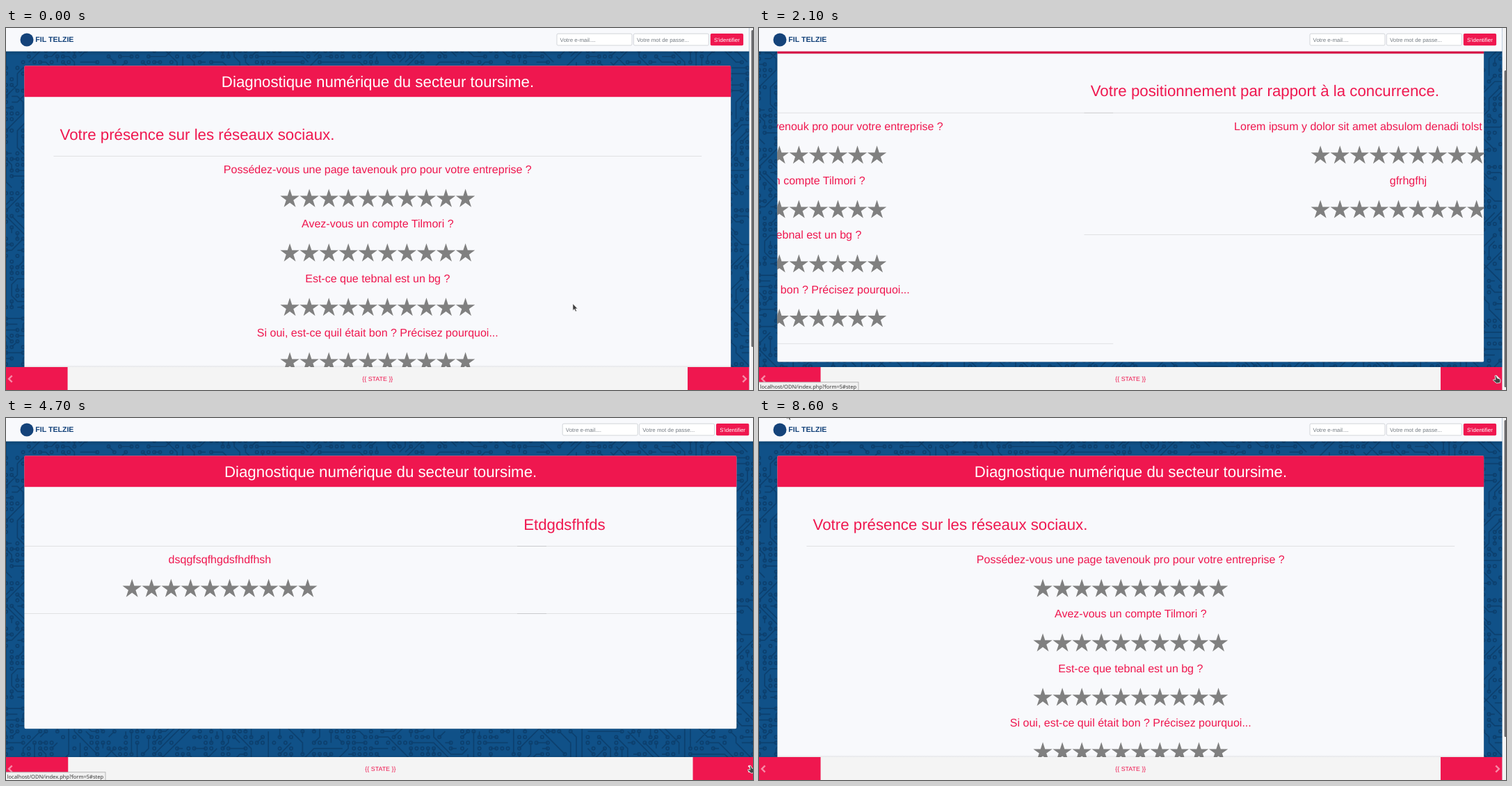
Animation, 1074 px wide and 521 px high, one loop 8.8 s. Source, as an HTML page:

```html
<!DOCTYPE html>
<html lang="fr">
<head>
<meta charset="utf-8">
<title>Diagnostique</title>
<style>
html, body { margin: 0; width: 1074px; height: 521px; overflow: hidden; background: #105188; }
svg { display: block; }
text { font-family: "Liberation Sans", Arial, sans-serif; text-rendering: geometricPrecision; white-space: pre; }
</style>
</head>
<body>
<svg width="1074" height="521" viewBox="0 0 1074 521">
  <defs>
    <polygon id="star"/>
    <linearGradient id="shade" x2="0" y2="1">
      <stop offset="0" stop-opacity=".16"/><stop offset="1" stop-opacity="0"/>
    </linearGradient>
  </defs>
  <rect width="1074" height="521" fill="#105188"/>
  <path id="circuit" fill="none" stroke="#0c406f" stroke-width="1.7" stroke-linejoin="round"/>
  <g id="scene"></g>
</svg>
<script>
const LOOP = 8800, STEP = 100, SLIDE = 600;
const RED = '#ef174f', PAPER = '#f8f9fc', GREY = '#808080', HOT = '#ffa500';
const NARROW = 1068.6, WIDE = 1076.8, MAX_SCROLL = 62.4;
const ROW = 78.3, STAR_W = 28.06, STAR_R = 14.4;
const $ = id => document.getElementById(id);

const pages = [
  { title: 'Votre présence sur les réseaux sociaux.', bottom: 543.2, asks: [
    'Possédez-vous une page tavenouk pro pour votre entreprise ?',
    'Avez-vous un compte Tilmori ?',
    'Est-ce que tebnal est un bg ?',
    'Si oui, est-ce quil était bon ? Précisez pourquoi...'] },
  { title: 'Votre positionnement par rapport à la concurrence.', bottom: 447.5, asks: [
    'Lorem ipsum y dolor sit amet absulom denadi tolst mano este calibro ?',
    'gfrhgfhj'] },
  { title: 'Etdgdsfhfds', bottom: 447.5, asks: ['dsqgfsqfhgdsfhdfhsh'] }
];

// start time, page left, page entered
const slides = [[1908, 0, 1], [3830, 1, 2], [4590, 2, 2], [5583, 2, 0]];

// time, x, y, pointer kind
const moves = [
  [0, 815, 397, 'arrow'], [200, 842, 343, 'arrow'], [500, 880, 392, 'arrow'],
  [600, 944, 452, 'arrow'], [700, 993, 488, 'arrow'], [800, 1024, 495, 'arrow'],
  [1000, 1048, 499, 'arrow'], [1200, 1058, 500, 'arrow'], [1500, 1058, 500, 'hand'],
  [2600, 1058, 500, 'arrow'], [3800, 1069, 500, 'hand'], [6200, 985, 470, 'arrow'],
  [6300, 640, 330, 'arrow'], [6400, 379, 213, 'beam'], [6500, 408, 240, 'arrow'],
  [6600, 480, 248, 'arrow'], [6700, 570, 322, 'arrow'], [6800, 644, 400, 'arrow'],
  [6900, 663, 475, 'arrow'], [7000, 622, 476, 'arrow'], [7100, 580, 402, 'arrow'],
  [7200, 590, 322, 'arrow'], [7300, 611, 246, 'arrow'], [7400, 400, 120, 'arrow'],
  [7500, 143, 4, 'arrow'], [7600, 0, 0, 'none'], [8200, 40, -8, 'arrow']
];

const pointers = {
  arrow: '<path d="M0 0V9.4L2.2 7.5L3.9 11L5.4 10.3L3.8 6.9H6.6Z" fill="#3b3b3b" stroke="#e8e8e8" stroke-width=".6"/>',
  hand: '<path d="M0 .6Q1-.6 2 .6L3.4 4L7.4 5.2Q8.4 6 7.6 10.6L2.4 11.2L-2.6 7Q-2.6 5.4 0 6L1 6.2Z" fill="#444" stroke="#eee" stroke-width=".9"/>',
  beam: '<path d="M-2-4.6Q0-4.6 0-3.6Q0-4.6 2-4.6M0-3.6V3.8M-2 4.8Q0 4.8 0 3.8Q0 4.8 2 4.8" fill="none" stroke="#555" stroke-width=".8"/>',
  none: ''
};

// CSS "ease": cubic-bezier(.25, .1, .25, 1)
function ease(x) {
  if (x <= 0) return 0;
  if (x >= 1) return 1;
  let lo = 0, hi = 1, s = 0.5;
  for (let i = 0; i < 24; i++, s = (lo + hi) / 2) {
    const v = 0.75 * s * (1 - s) + s ** 3;
    if (v < x) lo = s; else hi = s;
  }
  return 0.3 * s * (1 - s) ** 2 + 3 * s * s * (1 - s) + s ** 3;
}

function circuitPath() {
  let seed = 11, d = '';
  const rnd = () => (seed = (seed * 16807) % 2147483647) / 2147483647;
  const cell = 8.2, cols = 133, rows = 74, used = new Set();
  const dirs = [[1, 0], [1, 1], [0, 1], [-1, 1], [-1, 0], [-1, -1], [0, -1], [1, -1]];
  const free = (c, r) => c >= 0 && r >= 0 && c < cols && r < rows && !used.has(r * cols + c);
  const ring = (x, y) => `M${x - 2.2} ${y}a2.2 2.2 0 1 0 4.4 0a2.2 2.2 0 1 0-4.4 0`;
  const hidden = (x, y) => x > 45 && x < 1024 && y > 70 && y < 432;
  for (let n = 0; n < 7000; n++) {
    let c = Math.floor(rnd() * cols), r = Math.floor(rnd() * rows);
    let dir = Math.floor(rnd() * 4) * 2;
    if (!free(c, r) || hidden(c * cell, r * cell)) continue;
    const pts = [];
    for (let k = 0; k < 10 && free(c, r); k++) {
      used.add(r * cols + c);
      pts.push([+(c * cell).toFixed(1), +(r * cell).toFixed(1)]);
      if (rnd() < 0.28) dir = (dir + (rnd() < 0.5 ? 1 : 7)) % 8;
      c += dirs[dir][0];
      r += dirs[dir][1];
    }
    d += ring(...pts[0]);
    if (pts.length > 1) {
      d += 'M' + pts.map(p => p.join(' ')).join('L');
      if (rnd() < 0.5) d += ring(...pts[pts.length - 1]);
    }
  }
  return d;
}

const box = (x, y, w, h, fill, more = '') =>
  `<rect x="${x}" y="${y}" width="${w}" height="${h}" fill="${fill}" ${more}/>`;
const label = (x, y, size, fill, str, more = '') =>
  `<text x="${x}" y="${y}" font-size="${size}" fill="${fill}" ${more}>${str}</text>`;
const MID = 'text-anchor="middle"';

function pageSvg(page, w, shift, spot) {
  const half = w * 0.436, mid = w / 2;
  const rule = y => box(mid - half, y, half * 2, 0.6, '#000', 'fill-opacity=".17"');
  let s = label(mid - half + 9.2, 160.8, 22.28, RED, page.title) + rule(184.2);
  page.asks.forEach((ask, i) => {
    const y = 246 + i * ROW;
    s += label(mid, y - 36.9, 16, RED, ask, MID);
    const over = spot && Math.abs(spot.y - y) < 16 ? Math.floor((spot.x - mid) / STAR_W + 5) : -1;
    for (let k = 0; k < 10; k++) {
      const x = mid + (k - 4.5) * STAR_W;
      s += `<use href="#star" x="${x}" y="${y}" fill="${k <= over ? HOT : GREY}"/>`;
    }
  });
  s += rule(281.4 + (page.asks.length - 1) * ROW);
  return `<g transform="translate(${shift} 0)">${s}</g>`;
}

function header(w) {
  const r = w - 1068.6;
  const field = (x, str) =>
    box(x + r, 8.2, 108, 16.8, '#fff', 'rx="1.8" stroke="#c8ccd1" stroke-width=".8"') +
    label(x + r + 4.6, 19.6, 7.95, '#747b82', str);
  return box(0, 33.5, w, 6, 'url(#shade)') + box(0, 0, w, 33.6, PAPER) +
    '<circle cx="30" cy="17" r="9.5" fill="#14437a"/>' +
    label(42.3, 20, 10.6, '#14437a', 'FIL TELZIE', 'font-weight="bold"') +
    field(792, 'Votre e-mail....') + field(902.4, 'Votre mot de passe...') +
    box(1012.8 + r, 7.9, 47.3, 17.4, RED, 'rx="1.8"') +
    label(1036.4 + r, 19.6, 7.95, '#fff', "S'identifier", MID);
}

function footer(w, hot) {
  const side = w * 0.0829;
  const chevron = (x, k, o) =>
    `<path d="M${x - 2.4 * k} 500.4L${x + 2.2 * k} 505L${x - 2.4 * k} 509.6" fill="none" stroke="#fff" stroke-width="2.4" stroke-opacity="${o}"/>`;
  return `<g transform="translate(0 488) scale(1 -1)">${box(0, 0, w, 3, 'url(#shade)', 'opacity=".5"')}</g>` +
    box(0, 488, w, 33, '#f4f4f4') +
    box(0, 488, side, 33, RED) + box(w - side, 488, side, 33, RED) +
    chevron(6.3, -1, 0.5) + chevron(w - 6.9, 1, hot ? 0.95 : 0.5) +
    label(w / 2, 508.2, 8.9, RED, '{{ STATE }}', MID);
}

function statusOpacity(t) {
  if (t >= 1500 && t < 3000) return t < 2800 ? 1 : (3000 - t) / 300;
  if (t >= 3800 && t < 6400) return t < 6300 ? 1 : 0.4;
  return 0;
}

function scene(t) {
  let now = 0, next = 0, p = 0;
  for (const [start, from, to] of slides) {
    if (t < start) break;
    p = t < start + SLIDE ? ease((t - start) / SLIDE) : 0;
    now = p ? from : to;
    next = to;
  }
  const page = pages[now], tall = now === 0, w = tall ? NARROW : WIDE;
  const q = Math.min(1, Math.max(0, (t - 450) / 290));
  const scroll = tall && t < 3000 ? MAX_SCROLL * (1 - (1 - q) ** 2) : 0;
  const [, mx, my, kind] = moves.filter(m => m[0] <= t).pop();
  const spot = t >= 6500 && t < 7400 ? { x: mx, y: my } : null;
  const left = 26.2, top = 54.2, cardW = w - left * 2, cardH = page.bottom - top;
  const step = w * 0.833;

  $('circuit').setAttribute('transform', `translate(0 ${-scroll})`);

  let s = `<clipPath id="card"><rect x="${left}" y="${top}" width="${cardW}" height="${cardH}" rx="2.4"/></clipPath>`;
  s += `<g transform="translate(0 ${-scroll})"><g clip-path="url(#card)">` +
    box(left, top, cardW, cardH, PAPER) +
    box(left, top, cardW, 45, RED) +
    label(w / 2 + 0.2, 84.6, 22.28, '#fff', 'Diagnostique numérique du secteur toursime.', MID) +
    pageSvg(page, w, -p * step, spot) +
    (p ? pageSvg(pages[next], w, (1 - p) * step) : '') +
    box(left, top, cardW, cardH, 'none', 'rx="2.4" stroke="#000" stroke-opacity=".125" stroke-width="1.1"') +
    '</g></g>';
  s += header(w) + footer(w, (t >= 1400 && t < 3200) || (t >= 3800 && t < 8600));
  if (tall) {
    s += box(w, 0, 10, 521, '#f3f3f4') +
      box(1071.6, 3 + 58 * scroll / MAX_SCROLL, 6, 456, '#6c6c6e', 'rx="1.5"');
  }
  const o = statusOpacity(t);
  if (o) {
    s += `<g opacity="${o}">` +
      box(-1, 509.8, 144, 13, '#f1f1f1', 'stroke="#a9a9a9" stroke-width=".8"') +
      label(1.6, 518.8, 7.5, '#333', 'localhost/ODN/index.php?form=5#step',
        'style="font-family:\'Noto Sans\',\'Open Sans\',sans-serif"') + '</g>';
  }
  return s + `<g transform="translate(${mx} ${my})">${pointers[kind]}</g>`;
}

$('star').setAttribute('points', Array.from({ length: 10 }, (_, i) => {
  const a = i * Math.PI / 5, r = i % 2 ? STAR_R * 0.382 : STAR_R;
  return `${(r * Math.sin(a)).toFixed(2)},${(-r * Math.cos(a)).toFixed(2)}`;
}).join(' '));
$('circuit').setAttribute('d', circuitPath());

// the picture advances in steps of a tenth of a second
let shown = -1;
const begin = performance.now();
function tick() {
  const t = Math.floor(((performance.now() - begin) % LOOP) / STEP) * STEP;
  if (t !== shown) {
    shown = t;
    $('scene').innerHTML = scene(t);
  }
  requestAnimationFrame(tick);
}
tick();
</script>
</body>
</html>
```
